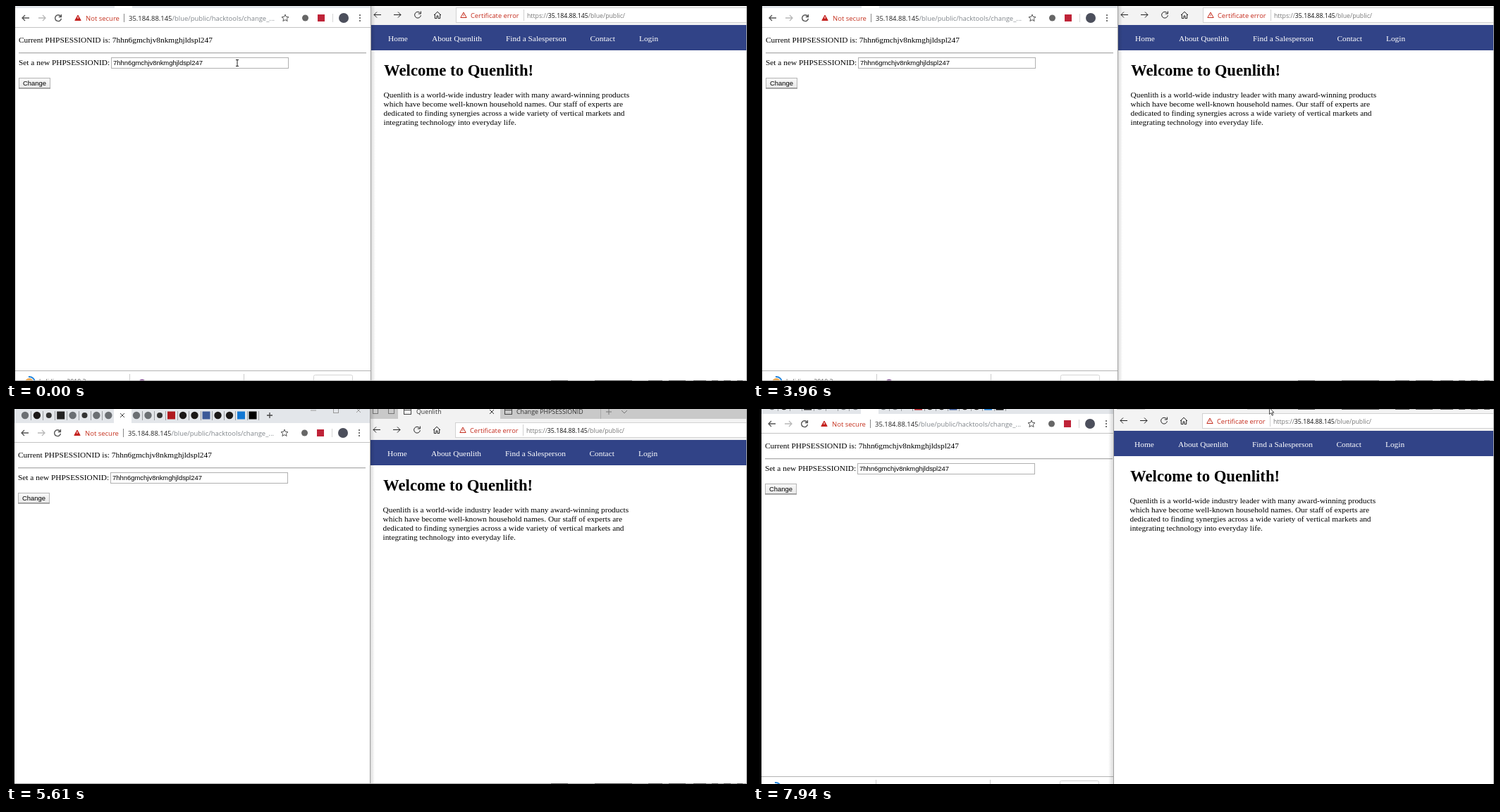
These frames come from a looping animation (1051x533 px, 8 s). An HTML page with a canvas:

```html
<!DOCTYPE html>
<html lang="en">
<head>
<meta charset="utf-8">
<title>Session change</title>
<style>
html, body { margin: 0; width: 100%; height: 100%; overflow: hidden; background: #fff; }
canvas { display: block; }
</style>
</head>
<body>
<canvas id="stage" width="1051" height="533"></canvas>
<script>
const W = 1051, H = 533, LOOP = 8000;
const g = document.getElementById('stage').getContext('2d');
const UI = '"Open Sans", "Noto Sans", sans-serif';
const SERIF = '"Liberation Serif", serif';
const SANS = '"Liberation Sans", sans-serif';
const SESSION = '7hhn6gmchjv8nkmghjldspl247';

// [start ms, screen shift x, screen shift y]
const SHIFTS = [[0, 0, 0], [5280, 1, 16], [5470, 1, 17], [5610, -1, 17], [5790, -1, 4]];

// [start ms, x, y, shape]
const POINTER = [
  [0, 328, 81, 'beam'], [280, 276, 76, 'beam'], [440, 118, 71, 'arrow'],
  [590, 105, 71, 'arrow'], [2980, 114, 72, 'arrow'], [3130, 200, 126, 'arrow'],
  [3250, 274, 173, 'arrow'], [3960, 0, 0, ''], [6100, 776, 53, 'arrow'],
  [6290, 712, 84, 'arrow'], [6440, 640, 130, 'arrow'], [6570, 560, 170, 'arrow'],
  [6690, 519, 190, 'arrow'], [7110, 690, 140, 'arrow'], [7240, 907, 105, 'arrow'],
  [7400, 804, 52, 'arrow'], [7550, 790, 30, 'arrow'], [7680, 762, 14, 'arrow'],
  [7810, 742, 6, 'arrow'], [7940, 732, -2, 'arrow']
];

const at = (list, t) => list.filter(k => k[0] <= t).pop();

function box(x, y, w, h, color) {
  g.fillStyle = color;
  g.fillRect(x, y, w, h);
}

function frame(x, y, w, h, color) {
  g.strokeStyle = color;
  g.lineWidth = 1;
  g.strokeRect(x + .5, y + .5, w - 1, h - 1);
}

function dot(x, y, r, color) {
  g.fillStyle = color;
  g.beginPath();
  g.arc(x, y, r, 0, 7);
  g.fill();
}

function text(s, x, y, font, color = '#000') {
  g.font = font;
  g.fillStyle = color;
  g.fillText(s, x, y);
}

function line(d, x, y, color, width = 1, fill) {
  const p = new Path2D(d);
  g.save();
  g.translate(x, y);
  if (fill) { g.fillStyle = fill; g.fill(p); }
  g.strokeStyle = color;
  g.lineWidth = width;
  g.stroke(p);
  g.restore();
}

// Window shadow that is darkest at x and fades out at end
function shadow(x, end) {
  const fade = g.createLinearGradient(x, 0, end, 0);
  fade.addColorStop(0, 'rgba(0,0,0,.16)');
  fade.addColorStop(1, 'rgba(0,0,0,0)');
  box(Math.min(x, end), -20, Math.abs(end - x), 580, fade);
}

const LEFT = 'M5 0H-5M-1-4L-5 0L-1 4', RIGHT = 'M-5 0H5M1-4L5 0L1 4';
const RELOAD = 'M3.6-2.4A4.4 4.4 0 1 0 4.4 .8M4.4-5V-1.5H.8';
const TRIANGLE = 'M0-4L4.2 3.5H-4.2Z', CROSS = 'M-3-3L3 3M3-3L-3 3', PLUS = 'M-4 0H4M0-4V4';
const STAR = 'M0-5L1.4-1.6L5-1.3L2.3 1L3.1 4.5L0 2.6L-3.1 4.5L-2.3 1L-5-1.3L-1.4-1.6Z';
const HOME = 'M-5 0L0-4.8L5 0M-3.7-1V4.6H-1V1H1V4.6H3.7V-1';

const TABS = 'gkcpgcggggcrkkfkkom';
const ICON = { g: '#6b6f73', k: '#1b1817', c: '#333', p: '#222', r: '#b0191e', f: '#3b5998', o: '#1277d3', m: '#000' };

function tabStrip(color) {
  box(13, -20, 504, 23, color);
  box(154, -20, 25, 23, '#fff');
  [...TABS].forEach((kind, i) => {
    const x = i < 8 ? 28 + 16.9 * i : 186 + 16.5 * (i - 8);
    if ('gkc'.includes(kind)) dot(x, -8, kind === 'c' ? 4 : 5.2, ICON[kind]);
    else box(x - 5.5, -13.5, 11, 11, ICON[kind]);
    if (i !== 7) box(Math.round(x + 8), -14, 1, 13, '#9a9da1');
  });
  line(CROSS, 166, -8, '#444');
  line(PLUS, 375, -8, '#444', 1.3);
  line('M-4 0H4', 437, -15, '#999');
  frame(465, -19, 8, 8, '#999');
  line(CROSS, 501, -15, '#999');
}

function downloads() {
  box(13, 518, 504, 30, '#fff');
  box(13, 518, 504, 1, '#b4b4b4');
  dot(33, 535, 6, '#e9a957');
  line('M-1-8A8 8 0 0 1 8 0', 33, 535, '#2385dc', 2);
  text('kali-linux-2019.3-v....ova', 47, 537, '8.75px ' + UI, '#555');
  dot(193, 536, 5.5, '#7b3f8c');
  box(175, 523, 1, 20, '#ccc');
  box(337, 523, 1, 20, '#ccc');
  g.strokeStyle = '#d4d4d4';
  g.beginPath();
  g.roundRect(436.5, 524.5, 55, 22, 2);
  g.stroke();
  text('Show all', 447, 539, '8.75px ' + UI, '#555');
  line(CROSS, 505, 535, '#777');
}

function leftWindow(t, stripColor, showBar) {
  box(13, -20, 504, 580, '#fff');
  tabStrip(stripColor);
  box(13, 30, 504, 1, '#c3c3c3');
  line(LEFT, 28, 17, '#555', 1.3);
  line(RIGHT, 51, 17, '#b8b8b8', 1.3);
  line(RELOAD, 74, 17, '#555', 1.4);
  line(TRIANGLE, 102, 17, '#c5221f', 1, '#c5221f');
  box(101.5, 15, 1, 3, '#fff');
  text('Not secure', 113, 20.5, '9.5px ' + UI, '#c5321f');
  box(167, 11, 1, 12, '#888');
  const font = '9.45px ' + UI, host = '35.184.88.145';
  text(host, 174, 20.5, font, '#222');
  text('/blue/public/hacktools/change_...', 174 + g.measureText(host).width, 20.5, font, '#80868b');
  line(STAR, 396, 17, '#555');
  dot(424.5, 17, 4.5, '#666');
  box(442, 12, 10, 10, '#bf2338');
  box(463, 11, 1, 12, '#d5d5d5');
  dot(479, 17, 7, '#4c4f5c');
  [13, 17, 21].forEach(y => dot(502, y, 1.1, '#555'));

  const body = '11.37px ' + SERIF;
  text('Current PHPSESSIONID is: ' + SESSION, 18, 52, body);
  box(18, 66, 493, 1, '#adadad');
  box(18, 67, 493, 1, '#e8e8e8');
  text('Set a new PHPSESSIONID:', 18, 84, body);
  const focused = t >= 280 && t < 3660, picked = t >= 440 && focused;
  frame(149, 73, 252, 16, focused ? '#3f87d9' : '#b0b0b0');
  if (picked) box(151.5, 75, 127.5, 12, '#338fff');
  text(SESSION, 152, 83.5, '9.45px ' + SANS, picked ? '#fff' : '#000');
  const shade = g.createLinearGradient(0, 102, 0, 117);
  shade.addColorStop(0, '#f9f9f9');
  shade.addColorStop(1, '#e9e9e9');
  box(18, 102, 45, 16, shade);
  frame(18, 102, 45, 16, '#b5b5b5');
  box(18, 116, 45, 1, '#979797');
  text('Change', 24, 113, '9.45px ' + SANS);
  if (showBar) downloads();
}

function edgeTabs() {
  box(517, -20, 540, 17, '#c9c9c9');
  box(557, -20, 145, 18, '#f2f2f2');
  frame(521, -18, 8, 8, '#777');
  frame(543, -18, 9, 8, '#777');
  [[565, 'Quenlith', 583], [708, 'Change PHPSESSIONID', 725]].forEach(([x, label, tx]) => {
    frame(x, -18, 11, 9, '#444');
    box(x, -16, 11, 1, '#444');
    text(label, tx, -10.3, '8.8px ' + UI, '#333');
  });
  box(844, -20, 1, 17, '#aaa');
  line(CROSS, 690, -13, '#333');
  line(PLUS, 856, -13, '#777');
  line('M-4-2L0 2L4-2', 878, -13, '#777');
}

function rightWindow(active) {
  const x0 = active ? 513 : 517;
  if (active) shadow(x0, x0 - 8);
  box(x0, -20, 1060 - x0, 580, '#fff');
  box(x0, -3, 1060 - x0, 30, '#f3f3f3');
  edgeTabs();
  line(LEFT, 527, 12.5, '#222');
  line(RIGHT, 555, 12.5, '#222');
  line(RELOAD, 584, 12.5, '#222');
  line(HOME, 612, 13, '#222');
  box(638, 2, 420, 22, '#fff');
  frame(638, 2, 420, 22, '#d2d2d2');
  line(TRIANGLE, 649, 13, '#c42b1c');
  box(648.6, 11.5, .8, 3, '#c42b1c');
  text('Certificate error', 659, 16.5, '9.3px ' + UI, '#c42b1c');
  box(734, 5, 1, 16, '#d0d0d0');
  let x = 739;
  [['https://', '#777'], ['35.184.88.145', '#111'], ['/blue/public/', '#777']].forEach(([s, color]) => {
    text(s, x, 16.5, '8.75px ' + UI, color);
    x += g.measureText(s).width;
  });

  box(x0, 27, 1060 - x0, 36, '#314387');
  [['Home', 542], ['About Quenlith', 604], ['Find a Salesperson', 709], ['Contact', 828.5], ['Login', 898]]
    .forEach(([s, nx]) => text(s, nx, 50, '11.37px ' + SERIF, '#fff'));
  text('Welcome to Quenlith!', 536, 99, 'bold 22.74px ' + SERIF);
  ['Quenlith is a world-wide industry leader with many award-winning products',
   'which have become well-known household names. Our staff of experts are',
   'dedicated to finding synergies across a wide variety of vertical markets and',
   'integrating technology into everyday life.']
    .forEach((s, i) => text(s, 535.5, 130 + 13 * i, '11.37px ' + SERIF));
  if (!active) shadow(x0, x0 + 7);
  box(active ? x0 - 1 : x0, -20, 1, 580, '#a0a0a0');
}

function pointer([, x, y, shape]) {
  if (shape === 'beam') line('M-2-4.5H2M0-4.5V4.5M-2 4.5H2', x, y, '#222');
  if (shape === 'arrow') line('M.5 .5V9.5L2.7 7.6L4.3 11.3L5.7 10.7L4.1 7H7Z', x, y, '#222', .8, '#fff');
}

function draw(t) {
  const [, dx, dy] = at(SHIFTS, t);
  box(0, 0, W, H, '#000');
  g.save();
  g.translate(dx, dy);
  leftWindow(t, t >= 5280 && t < 5470 ? '#fff' : '#e3e6ea', dy < 10);
  rightWindow(t >= 7240);
  g.restore();
  box(1050, 0, 1, H, '#a0a0a0');
  const bottom = dy === 0 || dy === 17;
  if (bottom) box(13 + dx, 532, W, 1, '#a5a5a5');
  [[773, 24], [835, 53], [911, 20], [940, 24], [975, 18], [1001, 9], [1018, 10], [1037, 8]]
    .forEach(([x, w]) => box(x, bottom ? 532 : 0, w, 1, '#555'));
  pointer(at(POINTER, t));
}

const start = performance.now();
function tick() {
  draw((performance.now() - start) % LOOP);
  requestAnimationFrame(tick);
}
tick();
</script>
</body>
</html>
```
